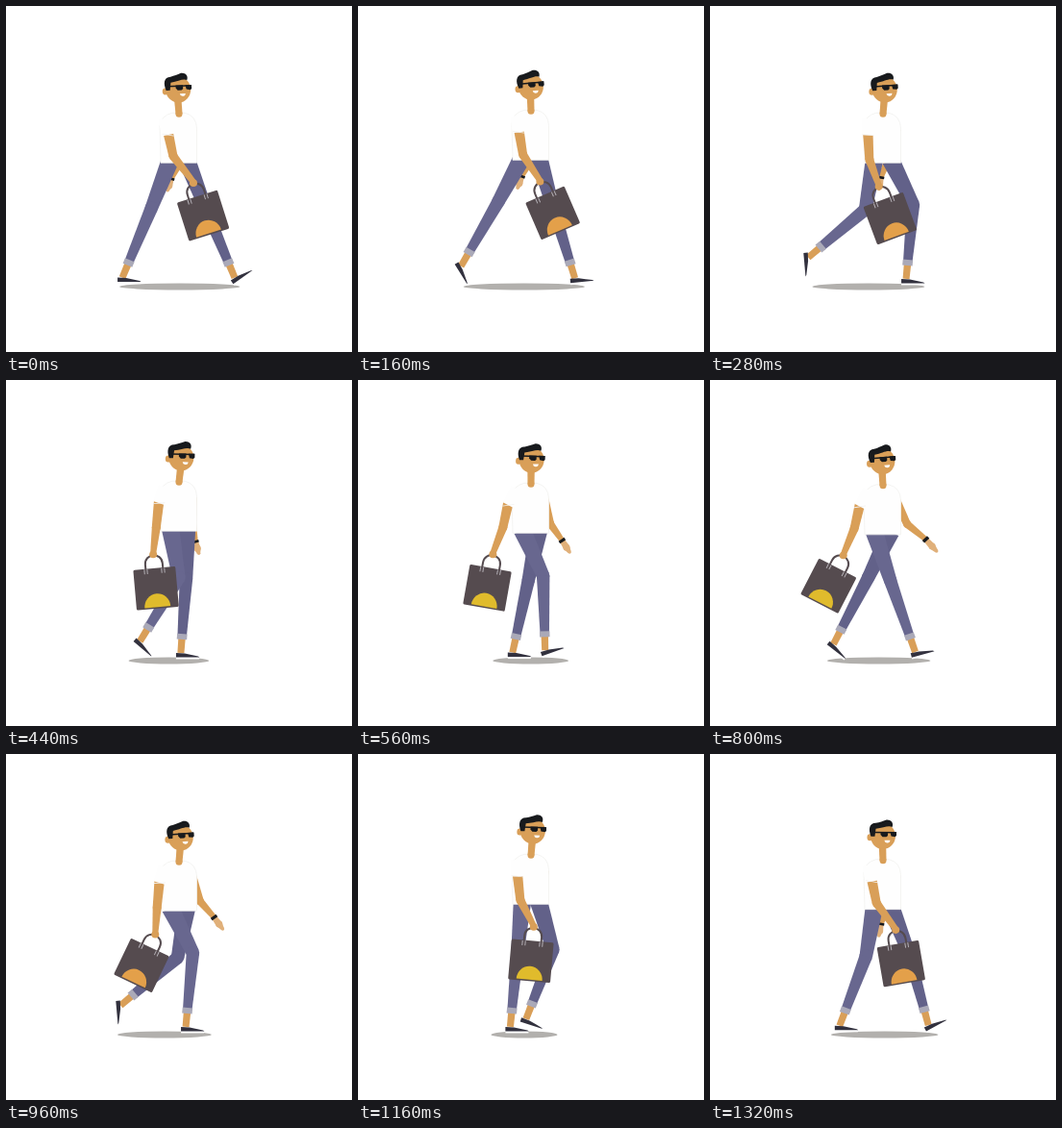
An HTML page with a canvas that plays this animation: 360 by 360 pixels, repeating every 1.36 s.

```html
<!DOCTYPE html>
<html lang="en">
<head>
<meta charset="utf-8">
<title>Walk cycle</title>
<style>
html, body { margin: 0; width: 100%; height: 100%; overflow: hidden; background: #fff; }
canvas { display: block; width: 360px; height: 360px; }
</style>
</head>
<body>
<canvas id="stage" width="360" height="360"></canvas>
<script>
const ctx = document.getElementById('stage').getContext('2d');
const LOOP = 1360, CYCLE = 32, HALF = CYCLE / 2;
const THIGH = 49.5, SHIN = 59.5, HIP_X = 171, HIP_GAP = 17;
const SKIN = '#d99f58', HAND = '#e0b07a', PANTS = '#68678f', PANTS_FAR = '#626189',
  CUFF = '#aaa9b8', BAG = '#554b4f', SHOE = '#32313e', HAIR = '#181a1d',
  SHIRT = '#fefefe', SEAM = '#f2f1ef', SHADOW = '#b2b0ad';

// Swings from -1 to 1, highest at the step "peak".
const swing = (step, peak, period = CYCLE) => Math.cos((step - peak) / period * Math.PI * 2);

function ease(from, to, s) {
  const u = Math.min(1, Math.max(0, (s - from) / (to - from)));
  return u * u * (3 - 2 * u);
}

function path(points, fill) {
  ctx.beginPath();
  points.forEach(([x, y]) => ctx.lineTo(x, y));
  ctx.closePath();
  ctx.fillStyle = fill;
  ctx.fill();
}

function oval(x, y, rx, ry, fill) {
  ctx.beginPath();
  ctx.ellipse(x, y, rx, ry, 0, 0, Math.PI * 2);
  ctx.fillStyle = fill;
  ctx.fill();
}

function placed(x, y, degrees, draw) {
  ctx.save();
  ctx.translate(x, y);
  ctx.rotate(degrees * Math.PI / 180);
  draw();
  ctx.restore();
}

// Tapered limb; joints are [x, y, width].
function limb(joints, fill, roundEnd) {
  for (let n = 1; n < joints.length; n++) {
    const [ax, ay, aw] = joints[n - 1], [bx, by, bw] = joints[n];
    const len = Math.hypot(bx - ax, by - ay) || 1;
    const nx = (ay - by) / len / 2, ny = (bx - ax) / len / 2;
    path([[ax + nx * aw, ay + ny * aw], [bx + nx * bw, by + ny * bw],
      [bx - nx * bw, by - ny * bw], [ax - nx * aw, ay - ny * aw]], fill);
    if (n < joints.length - 1 || roundEnd) oval(bx, by, bw / 2, bw / 2, fill);
  }
}

// Trouser end and foot angle: the foot swings forward, then slides back on the ground.
function footPose(step) {
  const s = (step % CYCLE) / HALF;
  if (s >= 1) {
    const ground = s - 1;
    return { x: 214 - 86 * ground ** 1.25, y: 266, angle: -35 * Math.max(0, 1 - 4.5 * ground) };
  }
  const lift = Math.sin(Math.PI * s ** 0.7) ** 2;
  return {
    x: 128 - 12 * ease(0, 0.2, s) + 98 * ease(0.4, 0.98, s),
    y: 266 - 16 * lift,
    angle: 85 * lift - 35 * ease(0.5, 0.85, s)
  };
}

// Two-bone leg with the knee bending forward.
function legPose(step, dx, hem) {
  const foot = footPose(step), hip = [HIP_X + dx, hem];
  const x = foot.x + dx - hip[0], y = foot.y - hem, reach = Math.hypot(x, y);
  const stretch = Math.max(1, reach / (THIGH + SHIN));
  const thigh = THIGH * stretch, shin = SHIN * stretch;
  const along = (thigh ** 2 - shin ** 2 + reach ** 2) / (2 * reach);
  const bend = Math.sqrt(Math.max(0, thigh ** 2 - along ** 2));
  const knee = [hip[0] + (x * along + y * bend) / reach, hem + (y * along - x * bend) / reach];
  const cuff = [foot.x + dx, foot.y];
  const below = d => cuff.map((c, n) => c + (c - knee[n]) / shin * d);
  return { hip, knee, below, ankle: below(18), angle: foot.angle };
}

function drawLeg({ hip, knee, below, ankle, angle }, fill) {
  limb([[...below(0), 7.5], [...ankle, 7]], SKIN);
  placed(...ankle, angle, () => {
    path([[-5, 4], [19, 4], [19, 6.5], [-5, 6.5]], '#fff');
    path([[-5, 0], [4, 0.5], [11, 2], [18, 3.5], [19.5, 4.5], [-5, 4.5]], SHOE);
  });
  limb([[hip[0], hip[1] - 3, 18.5], [...knee, 13.5], [...below(0), 9.5]], fill);
  limb([[...below(-2), 10.5], [...below(4), 10.5]], CUFF);
}

function drawShadow(a, b) {
  const middle = (a.ankle[0] + b.ankle[0]) / 2;
  const spread = Math.abs(a.ankle[0] - b.ankle[0]);
  oval(73 + middle * 0.6, 292, 30 + spread * 0.28, 3.4, SHADOW);
}

function drawFarArm(step, hem) {
  const c = swing(step, 18);
  const wrist = [197 + 27 * c, hem + 10.5 - 6 * c];
  const hand = f => [wrist[0] + (4 + 9 * c) * f, wrist[1] + 14 * f];
  limb([[194, hem - 35, 9], [194 + 11 * c, hem - 8 - 3 * c, 8], [...wrist, 5.5]], SKIN);
  limb([[...wrist, 5.5], [...hand(0.55), 7], [...hand(0.9), 3.5]], HAND, true);
  limb([[...hand(-0.05), 7], [...hand(0.13), 7]], HAIR);
}

function drawShirt(hem) {
  ctx.beginPath();
  ctx.moveTo(161, hem);
  ctx.lineTo(160, hem - 38);
  ctx.quadraticCurveTo(161, hem - 49, 173, hem - 52);
  ctx.lineTo(186, hem - 52);
  ctx.quadraticCurveTo(198, hem - 49, 198.5, hem - 36);
  ctx.lineTo(198.5, hem);
  ctx.closePath();
  ctx.fillStyle = SHIRT;
  ctx.fill();
  ctx.strokeStyle = SEAM;
  ctx.lineWidth = 0.8;
  ctx.stroke();
}

function drawHead(step, hem) {
  const x = 180.4 + 1.7 * swing(step, 8.5, HALF), y = hem - 74.7;
  limb([[x, y + 8, 7.5], [180, hem - 51, 7]], SKIN, true);
  placed(x, y, -1.5 + 3.7 * swing(step, 11.5, HALF), () => {
    oval(-13, 0, 3, 3.5, SKIN);
    oval(0.5, -1.5, 13, 13.5, SKIN);
    ctx.beginPath();
    ctx.moveTo(-8, -1);
    ctx.lineTo(-12, -1);
    ctx.bezierCurveTo(-15, -8, -14, -15, -7, -15);
    ctx.bezierCurveTo(-3, -16, 0, -17, 4, -18.5);
    ctx.bezierCurveTo(8, -19, 12, -16, 10, -11);
    ctx.bezierCurveTo(6, -13, 1, -10, -7, -9);
    ctx.closePath();
    ctx.fillStyle = HAIR;
    ctx.fill();
    ctx.fillRect(-11, -6, 25, 1.5);
    path([[-2, -6], [5.5, -6], [5.5, -2], [4, -0.8], [0, -0.8], [-2, -3]], HAIR);
    path([[8, -6], [14.5, -6], [14.5, -2], [13, -0.8], [9, -1.5]], HAIR);
    ctx.beginPath();
    ctx.arc(5, 2.5, 3, 0.1, Math.PI - 0.1);
    ctx.fillStyle = '#fff';
    ctx.fill();
  });
}

function drawBag(x, y, angle, badge) {
  placed(x, y, angle, () => {
    ctx.strokeStyle = BAG;
    ctx.lineWidth = 2;
    ctx.beginPath();
    ctx.moveTo(-9, 18);
    ctx.lineTo(-9, 8);
    ctx.bezierCurveTo(-9, -4, 9, -4, 9, 8);
    ctx.lineTo(9, 18);
    ctx.stroke();
    ctx.beginPath();
    ctx.roundRect(-22, 12.5, 44, 42, 1.5);
    ctx.fillStyle = BAG;
    ctx.fill();
    ctx.fillStyle = '#b3afb5';
    for (const side of [-9, 9]) {
      ctx.fillRect(side - 2, 13, 1, 5);
      ctx.fillRect(side + 1, 13, 1, 5);
    }
    ctx.beginPath();
    ctx.ellipse(0, 53, 13.5, 14, 0, Math.PI, Math.PI * 2);
    ctx.fillStyle = badge;
    ctx.fill();
  });
}

function drawNearArm(step, hem) {
  const c = swing(step, -0.2), raise = 4 * c * c;
  const hand = [165.5 + 29.5 * c, hem + 27 - raise];
  const elbow = [161.5 + 12.5 * c, hem - 3 - raise];
  const sleeve = [162 + 6.5 * c, hem - 29];
  const yellow = (step > 9 && step < 21) || (step > 24 && step < 29);

  drawBag(...hand, 2.5 + 26 * swing(step, 19.5), yellow ? '#e0bb2c' : '#e3a04a');
  limb([[sleeve[0], sleeve[1] - 3, 10.5], [...elbow, 9], [hand[0], hand[1] - 3, 6]], SKIN);
  oval(hand[0], hand[1] - 2, 4, 3.8, SKIN);
  limb([[165, hem - 46, 13], [...sleeve, 13]], SHIRT);
  limb([[sleeve[0] - 6, sleeve[1] - c, 0.8], [sleeve[0] + 6, sleeve[1] + c, 0.8]], SEAM);
}

function draw(step) {
  ctx.fillStyle = '#fff';
  ctx.fillRect(0, 0, 360, 360);
  const hem = 160.7 + 2 * swing(step, 3, HALF) + 2.4 * swing(step, -1, HALF / 2);
  const near = legPose(step, 0, hem);
  const far = legPose(step + HALF, HIP_GAP, hem);
  drawShadow(near, far);
  drawFarArm(step, hem);
  drawLeg(far, PANTS_FAR);
  drawLeg(near, PANTS);
  drawShirt(hem);
  drawHead(step, hem);
  drawNearArm(step, hem);
}

// 40 ms steps, three of which are held twice as long.
function stepAt(ms) {
  const tick = Math.floor((ms % LOOP) / 40);
  return tick - [1, 16, 30].filter(held => tick >= held).length;
}

const start = performance.now();
function frame() {
  draw(stepAt(performance.now() - start));
  requestAnimationFrame(frame);
}
frame();
</script>
</body>
</html>
```
